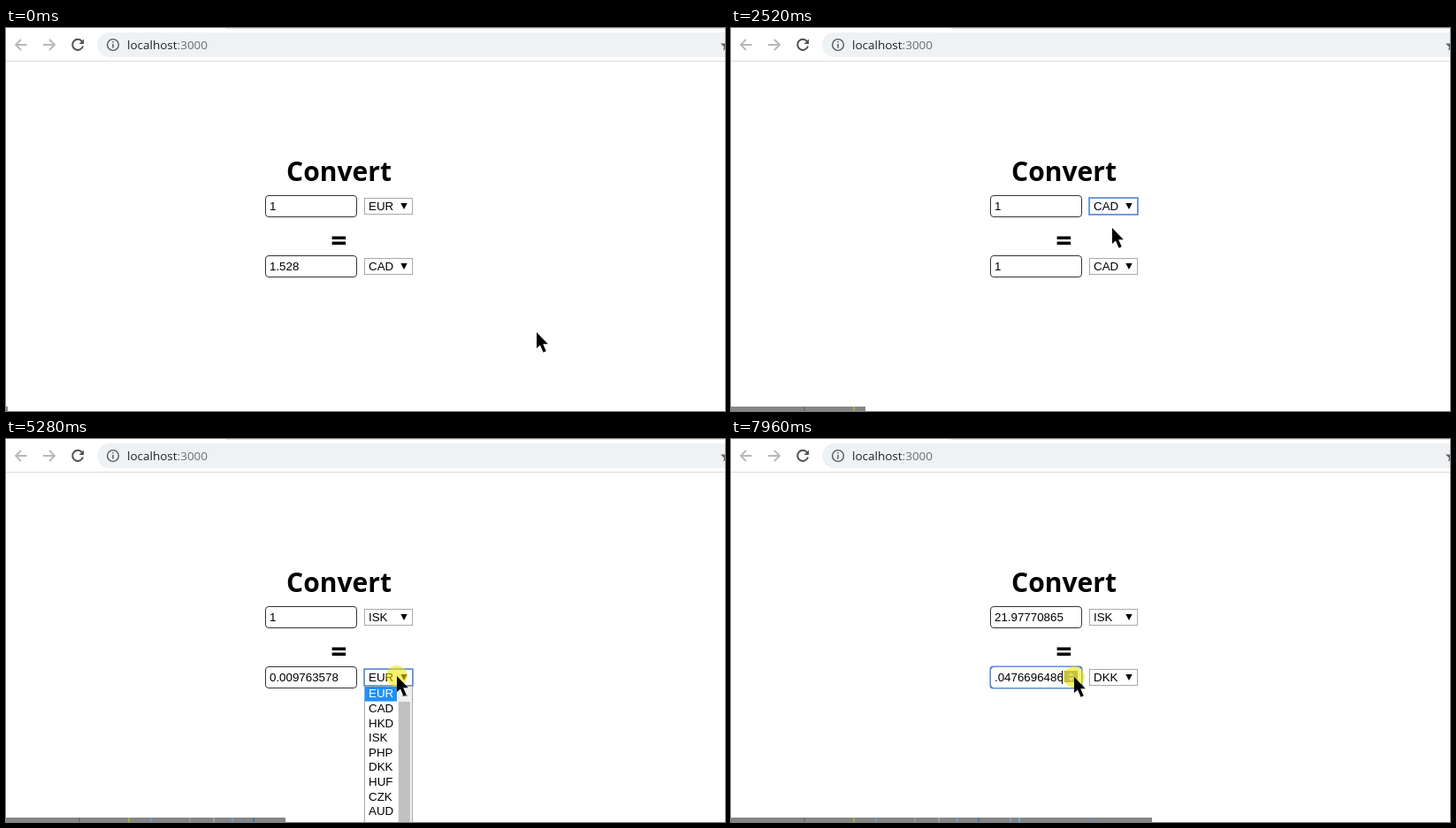
An HTML page for the animation above (8000 ms loop, 813 by 433 pixels).

```html
<!DOCTYPE html>
<html lang="en">
<head>
<meta charset="utf-8">
<title>Convert</title>
<style>
  html, body { margin: 0; width: 100%; height: 100%; overflow: hidden; background: #fff; }
  svg { display: block; width: 813px; height: 433px; }
  text { white-space: pre; }
  .ui { font: 13.333px "Liberation Sans", Arial, sans-serif; }
  .title { font: bold 30px "Open Sans", "Noto Sans", sans-serif; text-anchor: middle; }
  .url { font: 13.5px "Open Sans", "Noto Sans", sans-serif; fill: #202124; }
  .icon { fill: none; stroke-width: 1.8; }
  .input { fill: #fff; stroke: #333; }
  .select { fill: #fff; stroke: #a9a9a9; }
  .select.hover { stroke: #777; }
  .ring { fill: none; stroke: #5b8edb; stroke-width: 1.6; }
</style>
</head>
<body>
<svg viewBox="0 0 813 433">
  <path d="M249 .5H813" stroke="#dee1e6"/>
  <rect x="103" y="5" width="760" height="28" rx="14" fill="#eff2f4"/>
  <path d="M0 37.5H813" stroke="#dcdcdc"/>
  <g class="icon">
    <path d="M23.5 19H11M17 13L11 19L17 25M42 19H55M49 13L55 19L49 25" stroke="#b5b7b9"/>
    <path d="M86 15.2A6 6 0 1 0 87 20.5" stroke="#505357" stroke-width="2"/>
    <path d="M88 12.5V18H82.5Z" fill="#505357"/>
    <circle cx="121" cy="19" r="6.4" stroke="#55585c" stroke-width="1.4"/>
    <path d="M121 18V22.5M121 15V16.6" stroke="#55585c" stroke-width="1.5"/>
  </g>
  <path d="M808 17.5H813V24L811 25.5L812 21.5Z" fill="#5f6368"/>
  <text class="url" x="137" y="24">localhost<tspan fill="#6b6f74">:3000</tspan></text>

  <text class="title" x="376.5" y="173">Convert</text>
  <text class="title" x="376.5" y="251.5" style="font-size:32px">=</text>
  <g id="rows"></g>
  <g id="list" class="ui"></g>
  <g id="progress">
    <rect id="bar" y="428" height="5" fill="#868686"/>
    <g id="ticks"></g>
  </g>
  <circle id="press" r="12" fill="#f0e600" fill-opacity=".57"/>
  <path id="cursor" d="M0 0V18L4 14.5L7.6 22.7L10.7 21.3L7.2 13.2H12.8Z"/>
</svg>
<script>
const LOOP = 8000, STEP = 40, ROW = 16.6;
const codes = "EUR CAD HKD ISK PHP DKK HUF CZK AUD RON SEK IDR INR BRL RUB HRK JPY THB CHF SGD".split(" ");

// Each entry holds from its time until the next one.
const fromCode = [[0, "EUR"], [2280, "CAD"], [3880, "ISK"]];
const toCode = [[0, "CAD"], [4640, "EUR"], [6280, "ISK"], [7120, "DKK"]];
const fromValue = [[0, "1"], [7840, "21.97770865"]];
const toValue = [[0, "1.528"], [2320, "1"], [3920, "0.009763578"], [5400, "0.006389776"],
  [6320, "1"], [7160, "0.047669648"], [7840, ".0476696486"]];
const focus = [[0, ""], [1320, "from"], [4240, "to"], [7840, "input"]];
const opened = [[0, ""], [1320, "from"], [2280, ""], [2680, "from"], [3880, ""], [4240, "to"],
  [4640, ""], [5240, "to"], [6280, ""], [6720, "to"], [7120, ""]];
const clicks = [1320, 2280, 2680, 3880, 4240, 4640, 5240, 6280, 6720, 7120, 7840];
const path = [[0, 600, 344], [160, 600, 344], [840, 436, 199], [1080, 434, 198], [1360, 434, 198],
  [2200, 430, 237], [2320, 430, 237], [2520, 431, 226], [2680, 436, 202], [2800, 436, 202],
  [3760, 430, 270], [3920, 430, 270], [4240, 435, 270], [4360, 435, 270], [4600, 428, 288],
  [4720, 428, 288], [5240, 442, 268], [5360, 442, 268], [6200, 420, 337], [6320, 420, 337],
  [6520, 411, 263], [6720, 435, 271], [6800, 435, 271], [7080, 425, 370], [7160, 425, 370],
  [7560, 388, 269], [8000, 388, 269]];
const tickMarks = [[82, "#707070"], [138, "#a9ad35"], [163, "#7593c4"], [207, "#979797"],
  [234, "#a5a694"], [255, "#719bd0"], [267, "#718699"], [279, "#397da5"], [315, "#8d9bc0"],
  [325, "#70b1e0"], [403, "#6d8da8"], [410, "#668cae"]];

const $ = id => document.getElementById(id);
const at = (track, t) => track.findLast(([time]) => time <= t)[1];
const show = (el, on) => el.setAttribute("visibility", on ? "visible" : "hidden");

function add(parent, tag, attrs, text = "") {
  const el = document.createElementNS("http://www.w3.org/2000/svg", tag);
  for (const key in attrs) el.setAttribute(key, attrs[key]);
  el.textContent = text;
  return parent.appendChild(el);
}

function makeRow(y) {
  const g = add($("rows"), "g", { class: "ui", transform: `translate(0 ${y})` });
  add(g, "rect", { class: "input", x: 293.5, y: .5, width: 103, height: 24, rx: 3.5 });
  const inputRing = add(g, "rect", { class: "ring", x: 293.2, y: .2, width: 103.6, height: 24.6, rx: 3 });
  const value = add(g, "text", { x: 298, y: 17 });
  const spinner = add(g, "g", {});
  const spinBox = add(spinner, "rect", { x: 377, y: 5, width: 15, height: 13 });
  const spinArrows = add(spinner, "path", { d: "M381 10.5L384.5 7L388 10.5ZM381 13L384.5 16.5L388 13Z" });
  const caret = add(g, "path", { d: "M374.5 5V20", stroke: "#000" });
  const select = add(g, "rect", { class: "select", x: 405.5, y: 3.5, width: 54, height: 18 });
  const selectRing = add(g, "rect", { class: "ring", x: 405, y: 3, width: 55, height: 19 });
  const code = add(g, "text", { x: 410, y: 17 });
  add(g, "path", { d: "M446.3 9H453.7L450 16Z" });
  return { y, inputRing, value, spinner, spinBox, spinArrows, caret, select, selectRing, code };
}

const rows = { from: makeRow(189), to: makeRow(257) };

const list = $("list");
add(list, "rect", { x: 405.5, y: -.5, width: 54, height: 334, fill: "#fff", stroke: "#a9a9a9" });
const highlight = add(list, "rect", { x: 406, width: 36, height: ROW, fill: "#1e90ff" });
const items = codes.map((code, i) => add(list, "text", { x: 410, y: 12.4 + i * ROW }, code));
add(list, "rect", { x: 443, y: 0, width: 16, height: 333, fill: "#f1f1f1" });
add(list, "rect", { x: 444, y: 17, width: 13, height: 180, fill: "#c1c1c1" });
add(list, "path", { d: "M447 11H455L451 7Z", fill: "#a3a3a3" });

for (const [x, fill] of tickMarks) add($("ticks"), "rect", { x, y: 428, width: 2, height: 5, fill });
const ticks = [...$("ticks").children];

function cursorAt(t) {
  const i = path.findLastIndex(([time]) => time <= t);
  const [t0, x0, y0] = path[i], [t1, x1, y1] = path[i + 1];
  const p = (t - t0) / (t1 - t0), k = p * p * (3 - 2 * p);
  return [x0 + (x1 - x0) * k, y0 + (y1 - y0) * k];
}

function drawRow(row, name, t, value, code, [x, y], pressed) {
  const focused = at(focus, t);
  const over = y >= row.y && y < row.y + 25;
  const typing = name === "to" && focused === "input";
  const spinning = over && x > 293 && x < 397;
  row.value.textContent = value;
  row.code.textContent = code;
  row.select.classList.toggle("hover", over && x > 405 && x < 460 && !at(opened, t));
  show(row.selectRing, focused === name);
  show(row.inputRing, typing);
  show(row.caret, typing);
  show(row.spinner, spinning);
  row.spinBox.setAttribute("fill", pressed ? "#8f8f8f" : "#eee");
  row.spinArrows.setAttribute("fill", pressed ? "#ddd" : "#505050");
}

function drawList(t, codesNow, y) {
  const open = at(opened, t);
  show(list, open);
  if (!open) return;
  const top = rows[open].y + 23;
  const picked = y >= top ? Math.floor((y - top) / ROW) : codes.indexOf(codesNow[open]);
  list.setAttribute("transform", `translate(0 ${top})`);
  highlight.setAttribute("y", picked * ROW);
  items.forEach((item, i) => item.setAttribute("fill", i === picked ? "#fff" : "#000"));
}

function draw(t) {
  const pos = cursorAt(t);
  const pressed = clicks.some(c => t >= c && t < c + 160);
  const codesNow = { from: at(fromCode, t), to: at(toCode, t) };
  drawRow(rows.from, "from", t, at(fromValue, t), codesNow.from, pos, pressed);
  drawRow(rows.to, "to", t, at(toValue, t), codesNow.to, pos, pressed);
  drawList(t, codesNow, pos[1]);

  const move = `translate(${pos.map(Math.round).join(" ")})`;
  $("cursor").setAttribute("transform", move);
  $("press").setAttribute("transform", move);
  show($("press"), pressed);

  const width = Math.round(2 + t / STEP * 2.382);
  $("bar").setAttribute("width", width);
  ticks.forEach((tick, i) => show(tick, tickMarks[i][0] + 2 <= width));
}

const start = performance.now();
function loop() {
  const t = (performance.now() - start) % LOOP;
  draw(Math.floor(t / STEP) * STEP);
  requestAnimationFrame(loop);
}
loop();
</script>
</body>
</html>
```
